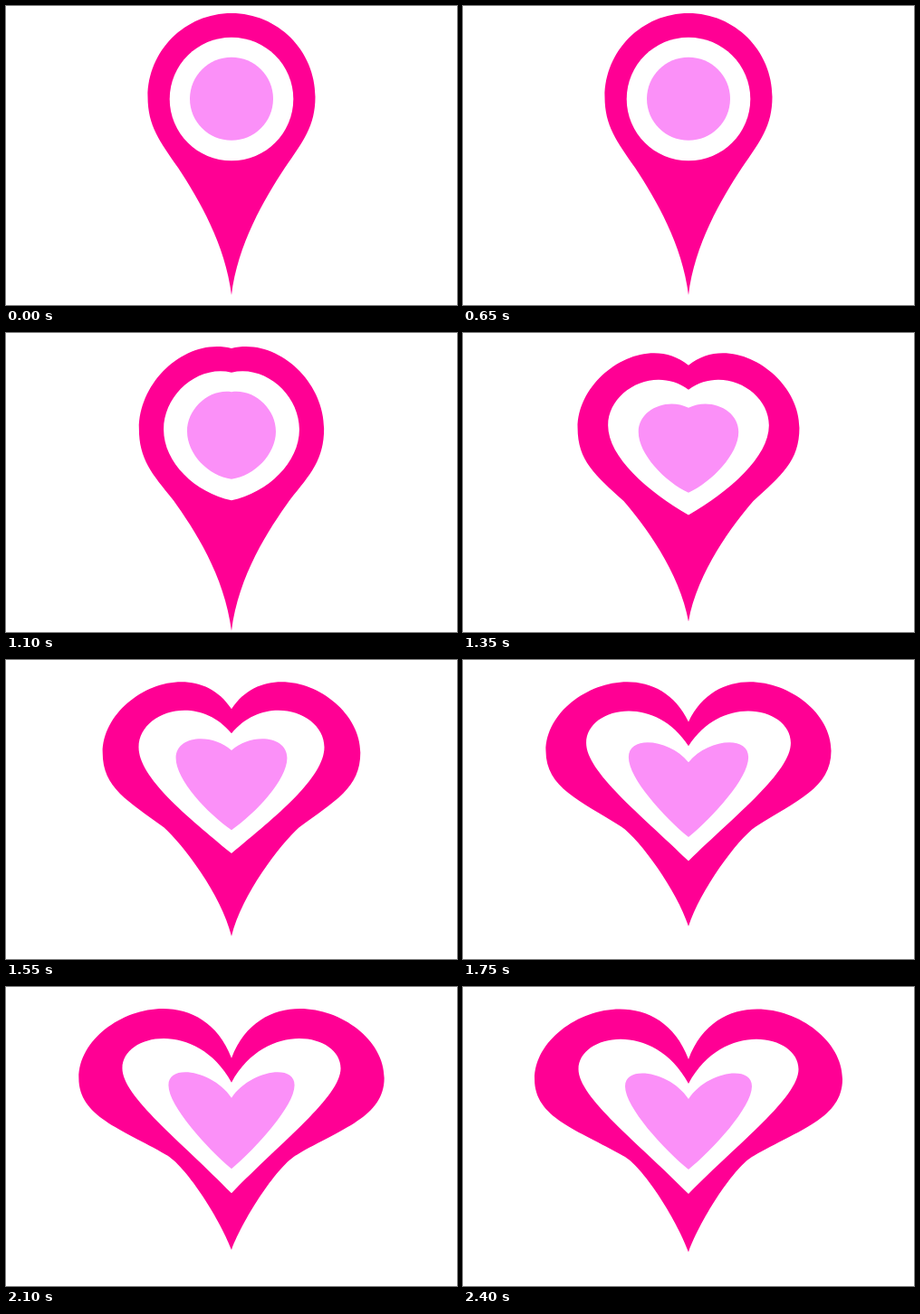
Write an HTML page with a canvas that moves like this. It is 498 by 331 pixels and loops after 3050 ms.

```html
<!DOCTYPE html>
<html lang="en">
<head>
<meta charset="utf-8">
<title>Pin to heart</title>
<style>
  html, body { margin: 0; width: 100%; height: 100%; overflow: hidden; background: #fff; }
  canvas { display: block; width: 498px; height: 331px; }
</style>
</head>
<body>
<canvas id="stage" width="498" height="331"></canvas>
<script>
const ctx = document.getElementById('stage').getContext('2d');
const AXIS = 249, LOOP = 3050, STEP = 50;
const MORPH_START = 650, MORPH_END = 2400;
const ROUND = 0.5523;

const lerp = (a, b, u) => a + (b - a) * u;

// Right half of a circle as Bezier points, with x measured from the axis.
function halfCircle(y, r) {
  const k = r * ROUND;
  return [[0, y - r], [k, y - r], [r, y - k], [r, y], [r, y + k], [k, y + r], [0, y + r]];
}

// Every shape runs from its notch over the side to its tip.
const pin = {
  color: '#ff0094',
  from: [...halfCircle(100.5, 92.5).slice(0, 4),
    [92.5, 133], [79, 150], [59, 179], [36, 214], [6.8, 264], [0, 320]],
  to: [[0, 80], [37, -19.5], [170, 31.7], [170, 102],
    [170, 145], [122, 158], [72, 187], [52, 197], [14, 255], [0, 293.5]]
};
const ring = {
  color: '#ffffff',
  from: halfCircle(103, 68.3),
  to: [[0, 107], [38, 36], [121.5, 52], [121.5, 91], [121.5, 122], [56, 172], [0, 229]]
};
const core = {
  color: '#fb90f8',
  from: halfCircle(102.8, 46),
  to: [[0, 124], [19.6, 93.7], [70, 85.2], [70, 110], [70, 133], [27, 180], [0, 202]]
};

// Steep S-curve from 0 to 1.
function ease(u) {
  const rise = 1.58 * u ** 2.27;
  return rise / (rise + (1 - u) ** 2.27);
}

function morph({ from, to }, u) {
  const p = ease(u);
  const swing = 18.5 * Math.sin(2 * Math.PI * u ** 1.2) * (1 - u);
  const sag = 0.4 * swing;
  const flare = 32 * p * (1 - p);
  const last = from.length - 1;
  const hasStem = last > 6;

  return from.map(([x, y], i) => {
    const [toX, toY] = to[i];
    if (i === last) return [0, hasStem ? lerp(y, toY, p) + swing : lerp(y, toY, p ** 0.68)];
    const bulge = hasStem && i > 4 && i < 8 ? flare : 0;
    return [lerp(x, toX, p) + bulge, lerp(y, toY, p) + (i > 1 ? sag : 0)];
  });
}

function fillMirrored(half, color) {
  const right = half.map(([x, y]) => [AXIS + x, y]);
  const left = half.map(([x, y]) => [AXIS - x, y]).reverse();
  ctx.beginPath();
  ctx.moveTo(...right[0]);
  for (const side of [right, left]) {
    for (let i = 1; i < side.length; i += 3) {
      ctx.bezierCurveTo(...side[i], ...side[i + 1], ...side[i + 2]);
    }
  }
  ctx.fillStyle = color;
  ctx.fill();
}

function draw(time) {
  const u = Math.min(Math.max((time - MORPH_START) / (MORPH_END - MORPH_START), 0), 1);
  ctx.fillStyle = '#ffffff';
  ctx.fillRect(0, 0, 498, 331);
  for (const shape of [pin, ring, core]) fillMirrored(morph(shape, u), shape.color);
}

const start = performance.now();
function tick() {
  const time = (performance.now() - start) % LOOP;
  draw(Math.floor(time / STEP) * STEP);
  requestAnimationFrame(tick);
}
tick();
</script>
</body>
</html>
```
